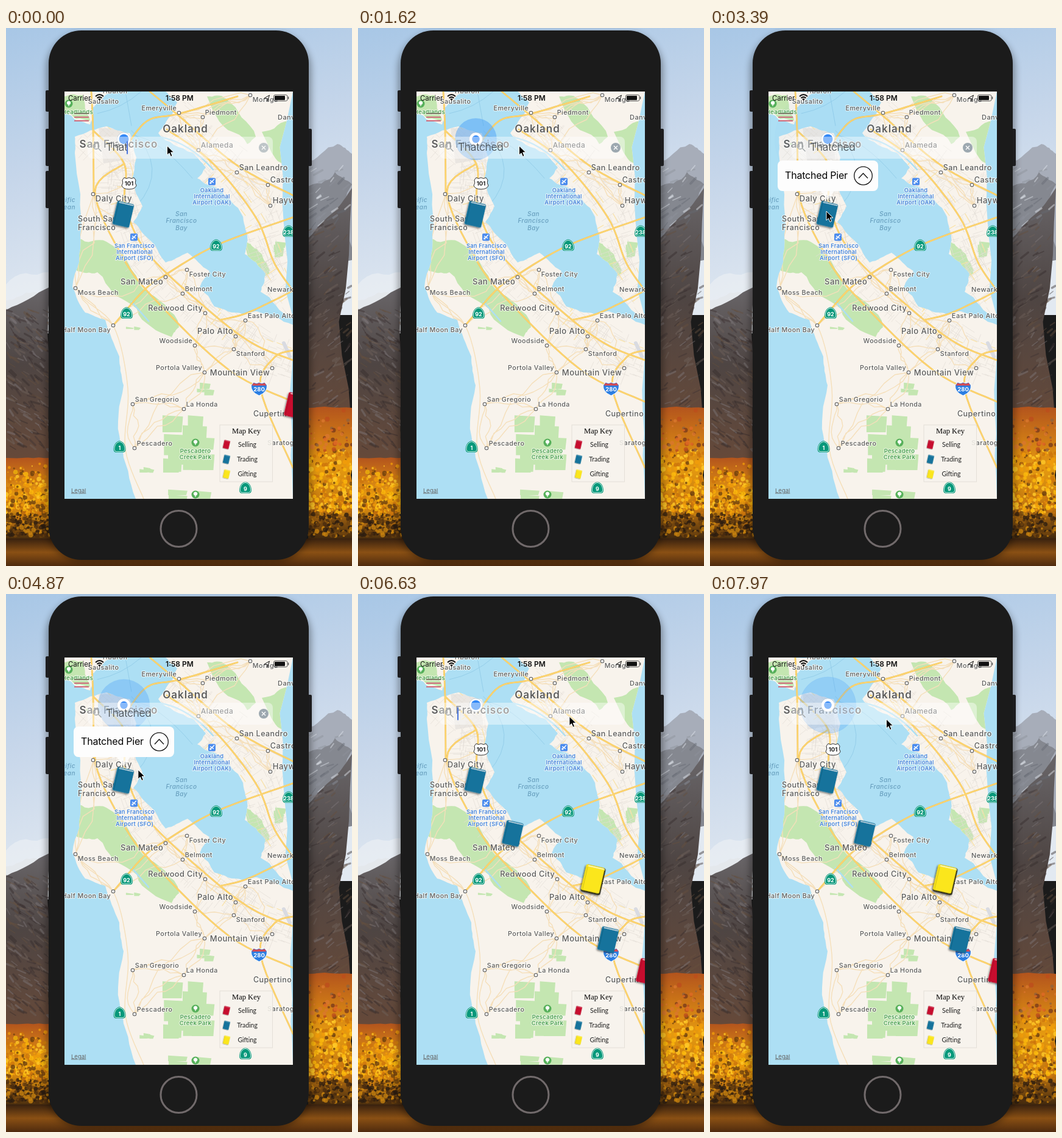
Animation of 568 by 881 pixels, one loop 8000 ms. Source, as an HTML page:

```html
<!DOCTYPE html>
<html lang="en">
<head>
<meta charset="utf-8">
<title>Book map</title>
<style>
html, body { margin: 0; width: 100%; height: 100%; overflow: hidden; background: #1b1b1b; }
svg { display: block; width: 568px; height: 881px; font-family: Inter, "Open Sans", sans-serif; }
.label { fill: #5c5c5c; stroke: #fffdfa; stroke-width: 2; stroke-opacity: .75; paint-order: stroke; stroke-linejoin: round; font-weight: 500; letter-spacing: .45px; }
.big { font-weight: 600; letter-spacing: 1px; }
.air { fill: #4483dc; font-weight: 600; letter-spacing: .2px; }
.sea { fill: #689fbe; stroke: none; font-style: italic; }
.park { fill: #4da254; font-weight: 600; letter-spacing: .2px; }
.sign { font-weight: 700; text-anchor: middle; fill: #fff; }
.mid { text-anchor: middle; }
.end { text-anchor: end; }
</style>
</head>
<body>
<svg viewBox="0 0 568 881">
  <defs>
    <linearGradient id="sky" x2=".25" y2="1">
      <stop stop-color="#a8c7e6"/><stop offset=".5" stop-color="#c6d6ea"/><stop offset="1" stop-color="#e2e9f1"/>
    </linearGradient>
    <linearGradient id="rock" x2="0" y2="1">
      <stop stop-color="#696669"/><stop offset=".4" stop-color="#4e4543"/><stop offset="1" stop-color="#6b4a37"/>
    </linearGradient>
    <linearGradient id="grove" x2="0" y2="1">
      <stop stop-color="#b3541d"/><stop offset=".45" stop-color="#e59a10"/><stop offset=".75" stop-color="#c07410"/><stop offset="1" stop-color="#2f1e0e"/>
    </linearGradient>
    <linearGradient id="lake" x2="0" y2="1">
      <stop stop-color="#38210f"/><stop offset=".5" stop-color="#8a5014"/><stop offset="1" stop-color="#4f2b0e"/>
    </linearGradient>
    <filter id="soft" x="-20%" y="-20%" width="140%" height="140%"><feGaussianBlur stdDeviation="6"/></filter>
    <filter id="drop" x="-40%" y="-40%" width="180%" height="180%"><feDropShadow dx="-1" dy="2" stdDeviation="1.6" flood-opacity=".5"/></filter>
    <clipPath id="screen"><path d="M96 104H471V771H96Z"/></clipPath>
    <clipPath id="ground"><path id="groundShape"/></clipPath>
    <path id="badge" d="M0-10C6-9 10-3 10 4Q10 9 5 9H-5Q-10 9-10 4C-10-3-6-9 0-10Z"/>
    <g id="tree"><circle r="6.5" fill="#56b05a"/><path d="M0 4V0M0-4a2.6 2.6 0 1 0 .1 0Z" fill="#fff" stroke="#fff" stroke-width="1.2"/></g>
    <g id="plane"><rect x="-6" y="-6" width="12" height="12" rx="2" fill="#4a8bee"/><path d="M-3.5 3.5 4-4M-3-2 3 2M-3.5 1-1 3.5" stroke="#fff" stroke-width="1.5"/></g>
    <g id="book">
      <rect x="-14" y="-19.5" width="28" height="39" rx="2.5"/>
      <path d="M-11-17.6H13" stroke="#fff" stroke-opacity=".8" stroke-width="1.3"/>
      <path d="M-11.5-16V18" stroke="#000" stroke-opacity=".16"/>
    </g>
  </defs>

  <g id="wallpaper"></g>
  <rect x="66" y="8" width="435" height="866" rx="60" opacity=".35" filter="url(#soft)"/>
  <g fill="#1d1d1f">
    <rect x="65" y="102" width="10" height="35" rx="2"/><rect x="65" y="165" width="10" height="61" rx="2"/>
    <rect x="65" y="234" width="10" height="61" rx="2"/><rect x="492" y="165" width="10" height="61" rx="2"/>
  </g>
  <rect x="70" y="4" width="427" height="867" rx="54" fill="#1b1b1b"/>
  <circle cx="283.5" cy="820" r="29.5" fill="none" stroke="#716a6b" stroke-width="3"/>

  <g clip-path="url(#screen)">
    <g id="map"></g>
    <g id="names"></g>
    <circle id="halo" cx="193.5" cy="182" fill="#459cf5" stroke="#459cf5"/>
    <circle cx="193.5" cy="182" r="11" fill="#fff" stroke="#7a93ad" stroke-opacity=".35"/>
    <circle id="dot" cx="193.5" cy="182" fill="#3187f6"/>
    <g id="books"></g>

    <g id="legend">
      <rect x="351" y="650" width="86.5" height="93" fill="#f8f4ed" fill-opacity=".88" stroke="#e4dfd8"/>
      <text x="394.5" y="663.5" class="mid" font-family="Liberation Serif, serif" font-size="12.5">Map Key</text>
    </g>

    <g stroke-width="2"><path d="M112 140H136" stroke="#7d7e68"/><path d="M112 146H136M112 152H136" stroke="#cf6b7c"/></g>

    <g font-size="12" fill="#111">
      <text x="102" y="118.5" font-size="11.4">Carrier</text>
      <text x="285" y="118.5" class="mid" font-weight="600">1:58 PM</text>
      <path d="M147 112Q153.5 106 160 112M149.500 114.800Q153.500 111.500 157.500 114.800" fill="none" stroke="#111" stroke-width="2"/>
      <path d="M153.500 119l-2.300-2.600q2.300-1.600 4.600 0Z"/>
      <path d="M424 115l8.500-5-3.200 9.500-1-4Z" fill="none" stroke="#111"/>
      <rect x="439.500" y="109.500" width="22.500" height="10" rx="2.500" fill="none" stroke="#555"/>
      <rect x="441" y="111" width="17" height="7" rx="1"/>
      <path d="M463.500 112.500v4" stroke="#555" stroke-width="1.500"/>
    </g>

    <rect x="134" y="178" width="304" height="36" rx="8" fill="#fff" fill-opacity=".42"/>
    <g fill="none" stroke="#a2a7a8" stroke-width="1.400"><circle cx="148" cy="193.500" r="4.700"/><path d="M151.500 197l5 5"/></g>
    <text id="query" x="164" y="201" font-size="17.500" font-weight="300" letter-spacing="-.3" fill="#3f4549"></text>
    <rect id="caret" y="185.500" width="2" height="21" fill="#4874dd"/>
    <g id="clear"><circle cx="423" cy="196" r="8" fill="#8c9ba4"/><path d="M420 193l6 6m0-6l-6 6" stroke="#fff" stroke-width="1.400"/></g>

    <g id="callout">
      <path d="M181 266H205L193 282Z" fill="#fff" fill-opacity=".75"/>
      <rect x="111" y="217" width="165" height="50" rx="8" fill="#fdfdfd"/>
      <text x="123" y="247" font-size="16" letter-spacing="-.2">Thatched Pier</text>
      <g fill="none" stroke="#111" stroke-width="1.300"><circle cx="251.500" cy="242" r="14.800"/><path d="M244 246l7.500-8 7.500 8"/></g>
    </g>
  </g>
  <path id="pointer" d="M0 0V15L3.500 11.800 6 17.500 8.600 16.400 6.200 10.800H11Z" stroke="#fff"/>
</svg>

<script>
const $ = id => document.getElementById(id);
let seed = 11;
const rnd = (lo = 0, hi = 1) => {
  seed = (seed * 16807) % 2147483647;
  return lo + (hi - lo) * seed / 2147483647;
};
const pick = list => list[Math.floor(rnd(0, list.length))];
const parse = s => s.split(' ').map(p => p.split(',').map(Number));
const mix = (a, b, u) => a + (b - a) * u;
const path = pts => 'M' + pts.map(p => p.map(v => v.toFixed(1))).join(' ');
const fill = (d, color, extra = '') => `<path d="${d}" fill="${color}" ${extra}/>`;
const line = (d, color, width, extra = '') => `<path d="${d}" fill="none" stroke="${color}" stroke-width="${width}" stroke-linecap="round" stroke-linejoin="round" ${extra}/>`;

// Points of a Catmull-Rom spline through the given key points.
function spline(pts, steps = 8) {
  const at = i => pts[Math.max(0, Math.min(pts.length - 1, i))], out = [];
  for (let i = 0; i < pts.length - 1; i++) {
    for (let s = 0; s < steps; s++) {
      const u = s / steps;
      out.push([0, 1].map(k => {
        const [a, b, c, d] = [at(i - 1), at(i), at(i + 1), at(i + 2)].map(p => p[k]);
        return b + u * ((c - a) + u * ((2 * a - 5 * b + 4 * c - d) + u * (3 * b - a - 3 * c + d))) / 2;
      }));
    }
  }
  return [...out, at(pts.length - 1)];
}

// Midpoint displacement: turns straight edges into a ragged outline.
function ragged(pts, amount = .12, depth = 3) {
  if (!depth) return pts;
  const out = [pts[0]];
  for (let i = 1; i < pts.length; i++) {
    const [a, b] = [pts[i - 1], pts[i]], k = rnd(-amount, amount);
    out.push([(a[0] + b[0]) / 2 - (b[1] - a[1]) * k, (a[1] + b[1]) / 2 + (b[0] - a[0]) * k], b);
  }
  return ragged(out, amount, depth - 1);
}
const outline = (s, amount) => path(ragged(parse(s), amount)) + 'Z';

function wallpaper() {
  const sides = [[0, 72], [496, 568]];
  let out = '<rect width="568" height="470" fill="url(#sky)"/>';
  out += fill(outline('0,420 70,400 70,480 0,480'), '#eef2f6', 'opacity=".6"');
  out += fill(outline('0,446 45,432 72,444 72,500 0,500'), '#e4e8ec');
  out += fill(outline('0,462 72,424 72,740 0,740', .03), 'url(#rock)');
  out += fill(outline('490,222 544,190 568,206 568,360 490,360'), '#a7adb9');
  out += fill(outline('490,262 540,236 568,256 568,380 490,380'), '#858890');
  out += fill(outline('490,350 540,300 568,262 568,700 490,700', .05), 'url(#rock)');
  for (let i = 0; i < 420; i++) {
    const right = i % 2, y = rnd(right ? 225 : 460, 690), snowy = right && y < 320;
    const hues = snowy ? ['#e4e9ef', '#656a74', '#8e929b'] : ['#352d2c', '#6f625b', '#3d3433', '#7e787a', '#66503f'];
    out += line(`M${rnd(...sides[right])} ${y}l${rnd(4, 14) * (right ? -1 : 1)} ${rnd(3, 10)}`, pick(hues), rnd(1, 4), 'opacity=".45"');
  }
  sides.forEach(([x0, x1], right) => {
    const top = right ? 622 : 704;
    out += fill(outline(`${x0},${top} ${x1},${top} ${x1},842 ${x0},842`, .05), 'url(#grove)');
    for (let i = 0; i < 520; i++) {
      const y = mix(top, 832, Math.sqrt(rnd()));
      const hues = y < 692 ? ['#bd4d1d', '#df6a26', '#7b3b1c', '#d9772d', '#94633a'] : y < 795 ? ['#fbb90c', '#f09c0a', '#cc740c', '#ffc928', '#6e410f'] : ['#c6810f', '#4a2c0f', '#2c1d10', '#6f430f'];
      out += `<circle cx="${rnd(x0, x1)}" cy="${y}" r="${rnd(1, 4)}" fill="${pick(hues)}" opacity=".8"/>`;
    }
  });
  return out + '<rect y="836" width="568" height="45" fill="url(#lake)"/>';
}

const freeways = [
  '143,168 194,222 196,290 232,368 330,460 404,516 471,544',
  '264,166 338,220 410,310 440,384 471,430',
  '236,104 284,144 378,224 471,274',
  '194,222 146,268 192,376 246,446 366,560 471,612',
  '196,196 232,152 286,140 380,112',
  '176,487 226,430 262,404 345,356 471,310',
  '352,478 392,468 440,446 471,430',
  '471,528 440,540 418,592 471,720',
  '140,104 143,168 144,272'
].map(s => spline(parse(s)));
const coastRoad = spline(parse('144,272 120,350 118,430 176,487 200,590 196,690 226,771'));

// Short streets scattered along a route and turned to follow it.
function streets(route, spread, count) {
  let d = '';
  for (let i = 0; i < count; i++) {
    const k = Math.floor(rnd(0, route.length - 1)), [a, b] = [route[k], route[k + 1]];
    const turn = Math.atan2(b[1] - a[1], b[0] - a[0]) + (i % 2) * Math.PI / 2, len = rnd(8, 26);
    const x = a[0] + rnd(-spread, spread), y = a[1] + rnd(-spread, spread);
    d += path([[x, y], [x + len * Math.cos(turn), y + len * Math.sin(turn)]]);
  }
  return d;
}

// A park made of overlapping survey blocks.
function blocks(cx, cy, rx, ry, count) {
  let d = '';
  for (let i = 0; i < count; i++) {
    const w = rx * rnd(.5, 1), h = ry * rnd(.4, .8), x = cx + rnd(-1, 1) * (rx - w / 2), y = cy + rnd(-1, 1) * (ry - h / 2);
    d += path([[x - w / 2, y - h / 2], [x + w / 2, y - h / 2 + 2], [x + w / 2 - 2, y + h / 2], [x - w / 2, y + h / 2]]) + 'Z';
  }
  return d;
}

// Each town hangs its label on one side of its dot, above or below.
const towns = [];
function town(name, x, y, side = 1, below = false, size = 10.7) {
  towns.push([x, y]);
  return `<circle cx="${x}" cy="${y}" r="2.7" fill="#fff" stroke="#6d6d6d" stroke-width="1.2"/>`
    + label(x + 3.8 * side, y + (below ? size * .35 + 7.5 : -4), size, name, side < 0 ? 'end' : '');
}
const label = (x, y, size, text, cls = '') => `<text x="${x}" y="${y}" font-size="${size}" class="label ${cls}">${text}</text>`;
const lines = (x, y, step, size, cls, text) => text.split('|').map((t, i) => label(x, y + i * step, size, t, cls)).join('');
const put = (id, x, y) => `<use href="#${id}" x="${x}" y="${y}"/>`;
const sign = (x, y, text) => `<g transform="translate(${x} ${y})"><use href="#badge" fill="#07987a"/><use href="#badge" transform="scale(.86)" fill="none" stroke="#fff"/><text class="sign" y="4.5" font-size="9">${text}</text></g>`;

function names() {
  const left = -1, right = 1, below = true;
  return town('Emeryville', 284, 139, left) + town('Piedmont', 323, 146) + town('Moraga', 401, 110, right, below)
    + town('Alameda', 316, 200, right, false, 12) + town('San Leandro', 379, 236.5, right, false, 12.5)
    + town('Castro Valley', 430, 257, right, false, 12.5) + town('Hayward', 434, 291, right, false, 13)
    + town('Daly City', 143, 272, right, below, 13) + town('Foster City', 297, 396, right, below)
    + town('San Mateo', 262, 408, left, below, 13) + town('Belmont', 290, 435) + town('Moss Beach', 114, 426, right, below)
    + town('Redwood City', 327, 467, left, false, 12.7) + town('Half Moon Bay', 176, 487, left, below)
    + town('East Palo Alto', 393, 479, right, false, 11) + town('Palo Alto', 377, 505, left, false, 13)
    + town('Stanford', 374, 526, right, below) + town('Woodside', 310, 520, left) + town('Portola Valley', 326, 564, left)
    + town('Mountain View', 437, 557, left, below, 13) + town('San Gregorio', 208, 616) + town('La Honda', 292, 624)
    + town('Pescadero', 211, 688)
    + label(294.5, 170.5, 17, 'Oakland', 'mid big') + label(185, 195.5, 17, 'San Francisco', 'mid big')
    + label(160, 124, 10.7, 'Sausalito', 'mid') + label(178, 107, 10.7, 'Tiburon', 'mid')
    + label(446, 150, 11, 'Danville') + label(429, 431.5, 11, 'Newark') + label(429, 683, 11, 'Saratoga')
    + label(406, 636, 12.5, 'Cupertino') + lines(118, 317, 13.5, 12.5, '', 'South San|Francisco')
    + lines(338, 269, 10, 9.3, 'mid air', 'Oakland|International|Airport (OAK)')
    + lines(211, 360, 10, 9.3, 'mid air', 'San Francisco|International|Airport (SFO)')
    + lines(288, 307.5, 11.5, 10, 'mid sea', 'San|Francisco|Bay') + lines(114, 285, 11.5, 10, 'end sea', 'Pacific|Ocean')
    + lines(311, 696, 10, 9.5, 'mid park', 'Pescadero|Creek Park') + label(92, 141, 9.5, 'Headlands', 'park')
    + '<text x="107" y="760.5" font-size="9.5" fill="#666" text-decoration="underline">Legal</text>'
    + put('tree', 311, 679) + put('tree', 311, 764) + put('tree', 103, 124) + put('plane', 338, 251.5) + put('plane', 210, 342.5)
    + sign(345, 356, '92') + sign(198, 467, '92') + sign(186.5, 686, '1') + sign(393, 753, '9') + sign(464, 333, '238')
    + '<g transform="translate(202 254)"><path d="M-8-9Q-4-6 0-9Q4-6 8-9L11-5Q9 0 12 4Q10 10 0 10Q-10 10-12 4Q-9 0-11-5Z" fill="#fff" stroke="#333"/><text class="sign" y="4" font-size="9.5" style="fill:#222">101</text></g>'
    + '<g transform="translate(415.5 590)"><path d="M-9-10Q-4-7 0-10Q4-7 9-10L13-5Q14 6 0 12Q-14 6-13-5Z" fill="#2b7ee2" stroke="#fff"/><path d="M-9-9Q-4-6 0-9Q4-6 9-9L12-4.5H-12Z" fill="#d94a50"/><text class="sign" y="5" font-size="9.5">280</text></g>';
}

function map() {
  const land = outline('113,178 165,161 203,172 214,212 206,250 224,292 209,318 241,352 262,384 298,368 334,398 318,424 342,456 388,468 412,464 471,486 471,771 213,771 188,680 193,585 186,538 163,478 130,466 109,424 122,340 113,205 113,178', .06)
    + outline('262,104 281,122 250,172 306,204 328,228 314,246 350,264 384,300 396,340 392,370 426,402 418,432 471,474 471,104', .1)
    + outline('96,104 172,104 140,132 138,158 96,140');
  $('groundShape').setAttribute('d', land);

  const parks = outline('118,345 165,350 226,428 284,490 272,506 215,460 150,400 114,396 118,345')
    + outline('96,112 126,110 138,152 96,136') + outline('330,112 362,116 410,178 396,190 340,136')
    + outline('420,170 471,150 471,232 436,204') + outline('390,346 412,362 432,402 406,410')
    + blocks(298, 684, 46, 50, 14) + blocks(300, 770, 40, 18, 4) + blocks(208, 496, 14, 8, 3)
    + blocks(328, 590, 18, 14, 3) + blocks(134, 187, 16, 4, 1) + blocks(230, 726, 16, 12, 3) + blocks(452, 366, 18, 22, 4);

  const nearest = towns.map(a => [...towns].sort((p, q) => Math.hypot(p[0] - a[0], p[1] - a[1]) - Math.hypot(q[0] - a[0], q[1] - a[1])));
  const lanes = nearest.map(([a, ...others]) => others.slice(0, 3).map(b => path(ragged([a, b], .16))).join('')).join('');
  const [bayside, eastside, foothills] = freeways;

  let out = '<rect x="96" y="104" width="375" height="667" fill="#addff4"/>';
  out += line('M206 168Q270 230 214 292M208 176Q250 180 306 246M150 140Q190 132 222 104M206 160L196 104', '#8fc9e6', .8);
  out += fill(land, '#f8f3ec') + '<g clip-path="url(#ground)">' + fill(parks, '#c4e6b1');
  out += fill('M152 164H198L206 214 160 222Z', '#e4e1dc', 'opacity=".65"');
  out += line(streets(bayside, 30, 420) + streets(eastside, 34, 240) + streets(foothills, 28, 120), '#e3ddd6', .7);
  out += line(lanes + path(coastRoad), '#f5dfba', 1.4);
  out += line(streets(bayside, 18, 20) + streets(eastside, 22, 16), '#fae2a4', 1.2) + '</g>';
  out += line('M250 178Q300 186 340 232', '#addff4', 2.5) + line('M206 448L234 480', '#addff4', 2.5) + line('M456 516L466 538', '#d9dbe1', 6);
  const d = freeways.map(path).join('');
  return out + line(d, '#f0bd54', 2.7) + line(d, '#fdd671', 1.9);
}

const teal = '#12739c', red = '#c70d2f', yellow = '#fbe61c';
const book = (x, y, color, scale = 1) => `<use href="#book" fill="${color}" transform="translate(${x} ${y}) rotate(13) scale(${scale})" filter="url(#drop)"/>`;

$('wallpaper').innerHTML = wallpaper();
$('names').innerHTML = names();
$('map').innerHTML = map();
$('books').innerHTML = book(192.5, 305, teal) + '<g id="others">' + book(254, 392, teal)
  + book(386.5, 468, '#282818', 1.14) + book(385.5, 466.5, yellow, 1.1) + book(410.5, 566, teal) + '</g><g id="redBook">' + book(474, 618, red) + '</g>';
[[red, 'Selling'], [teal, 'Trading'], [yellow, 'Gifting']].forEach(([color, text], i) => {
  const y = 682 + i * 24.2;
  $('legend').innerHTML += book(362, y, color, .34) + `<text x="396" y="${y + 4}" class="mid" font-family="Lato, sans-serif" font-size="10.5" fill="#222">${text}</text>`;
});

const LOOP = 8000, TICK = 147.6, PULSE = 2970, PULSE_START = 490, CLEARED = 6030;
const word = 'Thatched';
const home = [264.5, 193], pin = [191, 300], clearButton = [418, 195], rest = [289.5, 205];

const ramp = (t, from, to) => Math.max(0, Math.min(1, (t - from) / (to - from)));
const ease = (t, from, to) => { const u = ramp(t, from, to); return u * u * (3 - 2 * u); };
const show = (id, alpha) => $(id).setAttribute('opacity', alpha);

function pointerAt(t) {
  const legs = [[pin, ease(t, 1640, 1990)], [clearButton, ease(t, 4730, 5400)], [rest, ease(t, 6200, 6750)]];
  const [x, y] = legs.reduce((p, [goal, u]) => p.map((v, k) => mix(v, goal[k], u)), home);
  return [x, y + 25 * Math.sin(Math.PI * ramp(t, 1640, 2100))];
}

function draw(now) {
  let t = Math.floor((now % LOOP + 8) / TICK) * TICK;
  if (t > 3400 && t < 3980) t = 3394;

  const phase = t % PULSE;
  const age = (t < PULSE ? Math.max(0, t - PULSE_START) : (t - PULSE_START) % PULSE);
  const alpha = .7 / (1 + (age / 1350) ** 4);
  $('halo').setAttribute('r', age * .03);
  $('halo').setAttribute('fill-opacity', alpha);
  $('halo').setAttribute('stroke-opacity', alpha * .35);
  $('dot').setAttribute('r', 8 - 1.8 * (ease(phase, 860, 1500) - ease(phase, 2050, 2400)));

  const cleared = t >= CLEARED;
  $('query').textContent = cleared ? '' : word.slice(0, 4 + Math.round(t / TICK));
  $('caret').setAttribute('x', 163 + (cleared ? 0 : $('query').getComputedTextLength()));
  show('caret', (t < 3240 || cleared) && t % 1060 < 530 ? 1 : 0);
  show('clear', .55 + .3 * ramp(t, 0, 300) - .85 * ramp(t, 6190, 6400));

  show('others', cleared ? 1 : 0);
  show('redBook', cleared || t < 280 ? 1 : 0);
  show('callout', ramp(t, 3100, 3390) - ramp(t, 5850, CLEARED));
  $('pointer').setAttribute('transform', `translate(${pointerAt(t)})`);
}

const start = performance.now();
function frame() {
  draw(performance.now() - start);
  requestAnimationFrame(frame);
}
frame();
</script>
</body>
</html>
```
